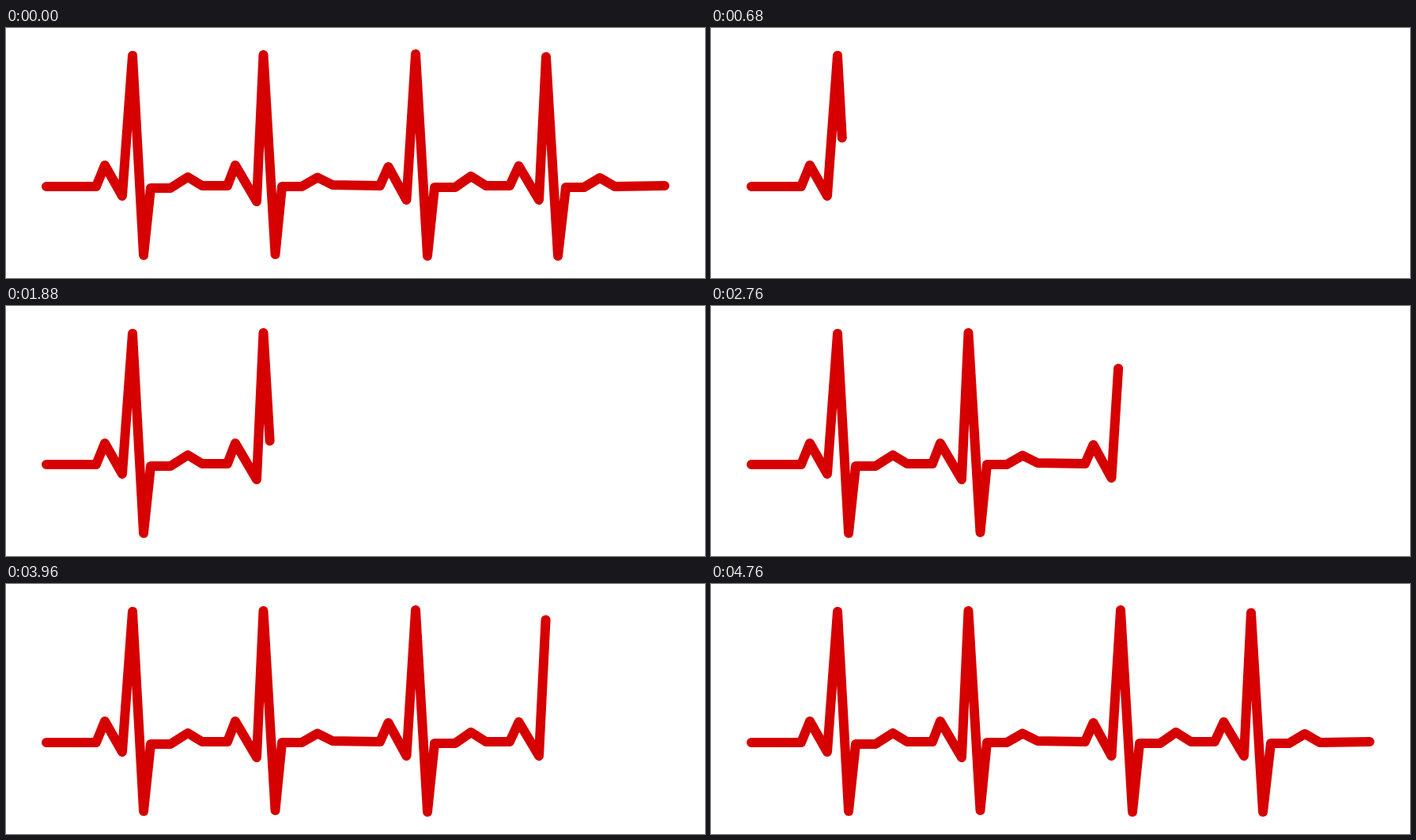
Recreate the animation shown at these times as an HTML page without scripts. Size 884 px wide and 317 px high, loop 4800 ms.

```html
<!DOCTYPE html>
<html lang="en">
<head>
<meta charset="utf-8">
<title>Heartbeat line</title>
<style>
  html, body {
    margin: 0;
    width: 100%;
    height: 100%;
    overflow: hidden;
    background: #fff;
  }
  svg {
    display: block;
    width: 100%;
    height: 100%;
  }
  .pulse {
    fill: none;
    stroke: #d60000;
    stroke-width: 12;
    stroke-linecap: round;
    stroke-linejoin: round;
    /* the tiny lead keeps each 40 ms step clear of its boundary */
    animation: trace 4.8s -2ms infinite;
  }
  /* one full tick, then the line is drawn at a constant speed in 40 ms steps */
  @keyframes trace {
    0% {
      stroke-dasharray: 3000px 4000px;
      animation-timing-function: step-end;
    }
    0.83333% {
      stroke-dasharray: 23.5px 4000px;
      animation-timing-function: steps(118, end);
    }
    99.16667%, 100% {
      stroke-dasharray: 2947px 4000px;
    }
  }
</style>
</head>
<body>
<svg viewBox="0 0 884 317">
  <polyline class="pulse" points="
    51,201 114,201 125,174 147,213 160,35 174,288 183,203 208,203 230,189 248,200
    280,200 290,174 317,220 325.5,34 340.5,287 349,201 374,201 394,189.5 413,199
    473,200 483.5,176 506.5,218 518,33 533,289 542,202 568,202 588,188 607,200
    637,200 648.5,175 674,218 683,36.5 698,289 708,202 731,202 751,190 770,201
    833,200"/>
</svg>
</body>
</html>
```
